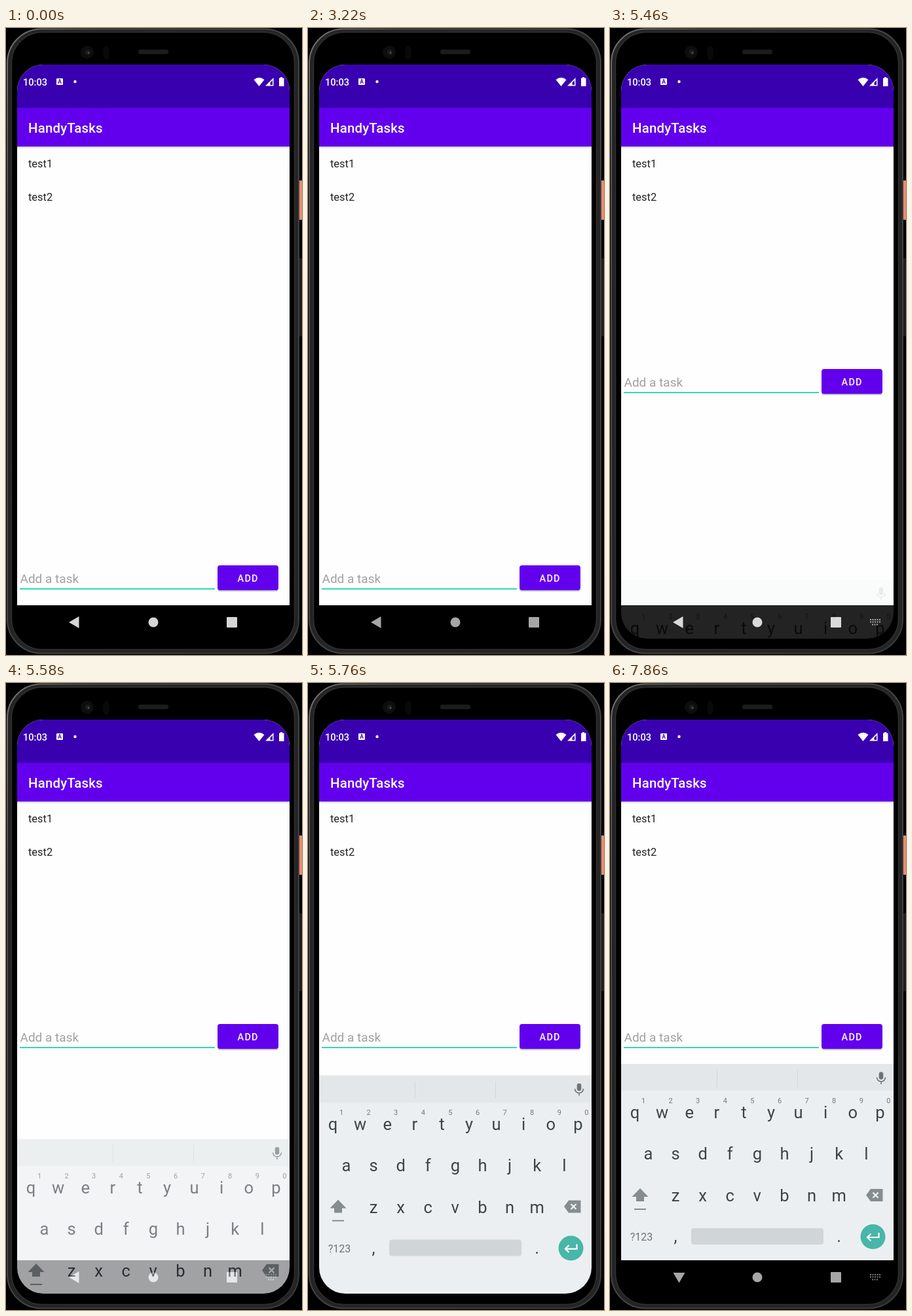
Recreate the animation shown at these times as an HTML page. Size 452x958 px, loop 8000 ms.

```html
<!DOCTYPE html>
<html lang="en">
<head>
<meta charset="utf-8">
<title>To-do list</title>
<style>
  html, body { margin: 0; width: 100%; height: 100%; overflow: hidden; background: #000; }
  svg { display: block; width: 100%; height: 100%; font-family: Roboto, "Open Sans", sans-serif; }
  .medium { font-weight: 500; fill: #fff; }
  .keys { font-size: 25.5px; fill: #3b4549; text-anchor: middle; }
  .hints { font-size: 11px; fill: #70787c; text-anchor: middle; }
</style>
</head>
<body>
<svg viewBox="0 0 452 958">
  <defs>
    <clipPath id="screen"><rect x="17" y="56" width="416" height="877" rx="40"/></clipPath>
    <clipPath id="window"><rect id="limit" x="17" y="56" width="416" height="877"/></clipPath>
    <linearGradient id="metal" x2="1" y2="1">
      <stop offset="0" stop-color="#747474"/>
      <stop offset=".15" stop-color="#4c4c4c"/>
      <stop offset="1" stop-color="#3a3a3a"/>
    </linearGradient>
    <linearGradient id="shade" x2="0" y2="1">
      <stop offset="0" stop-color="#000" stop-opacity=".25"/>
      <stop offset="1" stop-color="#000" stop-opacity="0"/>
    </linearGradient>
  </defs>

  <!-- phone body -->
  <rect width="452" height="958"/>
  <rect x="448" y="233" width="4" height="60" fill="#ec8a6e"/>
  <rect x="448" y="352" width="4" height="119" fill="#1e1e1e"/>
  <rect x="2" y="1.5" width="445" height="954" rx="52" fill="#242424" stroke="url(#metal)" stroke-width="2"/>
  <rect x="8.5" y="6.5" width="432" height="943" rx="47" fill="#000" stroke="#303030" stroke-width="1.500"/>
  <circle cx="124" cy="37" r="10" fill="#0d0d0d"/>
  <circle cx="125" cy="37" r="4" fill="#1c1c1c"/>
  <circle cx="126" cy="38" r="1.3" fill="#555"/>
  <ellipse cx="153" cy="38" rx="5" ry="11" fill="#090909"/>
  <rect x="202" y="33" width="46" height="7" rx="3" fill="#1c1c1c"/>

  <g clip-path="url(#screen)">
    <rect x="17" y="56" width="416" height="826" fill="#fefefe"/>
    <rect x="17" y="56" width="416" height="66" fill="#3900b0"/>
    <rect x="17" y="122" width="416" height="59" fill="#6200ee"/>
    <rect x="17" y="181" width="416" height="3" fill="url(#shade)"/>

    <!-- status bar -->
    <text class="medium" x="26" y="88" font-size="14.6">10:03</text>
    <rect x="77" y="77" width="10" height="10" rx="1" fill="#fff"/>
    <text x="82" y="85.3" font-size="8.5" font-weight="700" fill="#3900b0" text-anchor="middle">A</text>
    <g fill="#fff">
      <circle cx="105.500" cy="82" r="2.200"/>
      <path d="M378.500 79Q386.500 72.500 394.500 79L386.500 89Z"/>
      <path d="M396 88.500L408.500 76V88.500Z"/>
      <path d="M417 76.500H419V75H422V76.500H424.500V89H417Z"/>
    </g>
    <path d="M403.500 83.500L407 80V87H403.500Z" fill="#3900b0"/>

    <text class="medium" x="34" y="160" font-size="20.4" letter-spacing=".2">HandyTasks</text>
    <g font-size="16.4" fill="#222">
      <text x="34" y="213">test1</text>
      <text x="34" y="264">test2</text>
    </g>

    <!-- entry row -->
    <g id="row">
      <text x="21.500" y="848" font-size="19" fill="#a0a0a0">Add a task</text>
      <rect x="21" y="856" width="298" height="2" fill="#30d9b6"/>
      <rect x="323" y="823" width="93" height="38" rx="4" opacity=".22"/>
      <rect x="323" y="821" width="93" height="38" rx="4" fill="#6200ee"/>
      <text class="medium" x="353.500" y="846" font-size="14.4" letter-spacing="1.3">ADD</text>
    </g>

    <!-- navigation bar -->
    <rect x="17" y="882" width="416" height="51"/>
    <g id="nav">
      <path id="back" d="M96 908L111.500 899V917Z"/>
      <circle cx="225" cy="908" r="7.500"/>
      <rect x="337" y="900" width="16" height="16" rx="1"/>
      <path id="ime" d="M397 904H413M397 907.500H413M400 911.500H410" fill="none" stroke-width="2" stroke-dasharray="2 1.500"/>
    </g>

    <!-- keyboard -->
    <g clip-path="url(#window)">
      <g id="keyboard">
        <rect x="17" y="582" width="416" height="351" fill="#eceff1"/>
        <rect x="17" y="582" width="416" height="41" fill="#e4e7e9"/>
        <path d="M163.500 591V617M286.500 591V617" stroke="#d2d6d8"/>
        <g fill="none" stroke="#6c7478" stroke-width="1.600">
          <rect x="411.500" y="595" width="5" height="10" rx="2.500" fill="#6c7478"/>
          <path d="M407.500 602.500a6.500 6.500 0 0 0 13 0M414 609V613"/>
        </g>
        <g id="letters" class="keys"></g>
        <g id="digits" class="hints"></g>
        <path d="M46 772L58.500 785H52V792H40V785H33.500Z" fill="#858d91"/>
        <rect x="37" y="803" width="18" height="2" fill="#858d91"/>
        <path d="M391 782.500L398 773H416.500V792H398Z" fill="#858d91"/>
        <path d="M401.500 778.500L409.500 786.500M409.500 778.500L401.500 786.500" stroke="#f2f4f5" stroke-width="2.200"/>
        <text x="48" y="852" font-size="16" fill="#6c7478" text-anchor="middle">?123</text>
        <rect x="124" y="833" width="202" height="25" rx="4" fill="#d0d5d8"/>
        <circle cx="401.500" cy="846" r="19" fill="#48b6a8"/>
        <path d="M410.500 840V847H393.500M398.500 841.500L393 847L398.500 852.500" fill="none" stroke="#fff" stroke-width="2.200"/>
      </g>
    </g>
  </g>
</svg>
<script>
const LOOP = 8000, SHIFT = 300, OPEN = 5344, SLIDE = 590;
const STALL = [5620, 5720]; // the picture stands still here
const el = id => document.getElementById(id);
const set = (id, name, value) => el(id).setAttribute(name, value);
const ramp = (t, from, to) => Math.min(1, Math.max(0, (t - from) / (to - from)));

// cubic-bezier(.4, 0, .2, 1), solved by bisection
function ease(x) {
  let lo = 0, hi = 1, s = x;
  for (let i = 0; i < 24; i++) {
    s = (lo + hi) / 2;
    const r = 1 - s;
    if (1.2 * s * r * r + .6 * s * s * r + s ** 3 < x) lo = s; else hi = s;
  }
  return 3 * s * s - 2 * s ** 3;
}

function addKeys(parent, chars, x, y) {
  [...chars].forEach((c, i) => {
    const key = document.createElementNS("http://www.w3.org/2000/svg", "text");
    key.setAttribute("x", x + i * 41.6);
    key.setAttribute("y", y);
    key.textContent = c;
    el(parent).append(key);
  });
}
addKeys("letters", "qwertyuiop", 38, 665);
addKeys("letters", "asdfghjkl", 58.5, 728);
addKeys("letters", "zxcvbnm", 100, 792);
addKeys("letters", ",", 100, 854);
addKeys("letters", ".", 349.5, 854);
addKeys("digits", "1234567890", 51, 642);

function draw(t) {
  if (t > STALL[0] && t < STALL[1]) t = STALL[0];
  const shown = ease(ramp(t, OPEN, OPEN + SLIDE));
  set("keyboard", "transform", `translate(0 ${SHIFT * (1 - shown)})`);
  set("keyboard", "opacity", Math.min(1, shown * 1.1));
  // once settled, the keyboard stops at the navigation bar
  set("limit", "height", shown > .985 ? 826 : 877);
  set("row", "transform", `translate(0 ${t < OPEN ? 0 : -SHIFT})`);

  const glow = t < OPEN - 300 ? 1 - ramp(t, 0, 1520) : ramp(t, 5060, 5310) - ramp(t, 5720, 6100);
  const level = Math.round(166 + 48 * glow);
  const tint = `rgb(${level}, ${level}, ${level})`;
  set("nav", "fill", tint);
  set("ime", "stroke", tint);
  set("ime", "opacity", .75 * ramp(t, OPEN, OPEN + 100));
  set("back", "transform", `rotate(${-90 * ease(ramp(t, 5720, 6120))} 105 907.5)`);
}

function tick() {
  draw(performance.now() % LOOP);
  requestAnimationFrame(tick);
}
tick();
</script>
</body>
</html>
```
